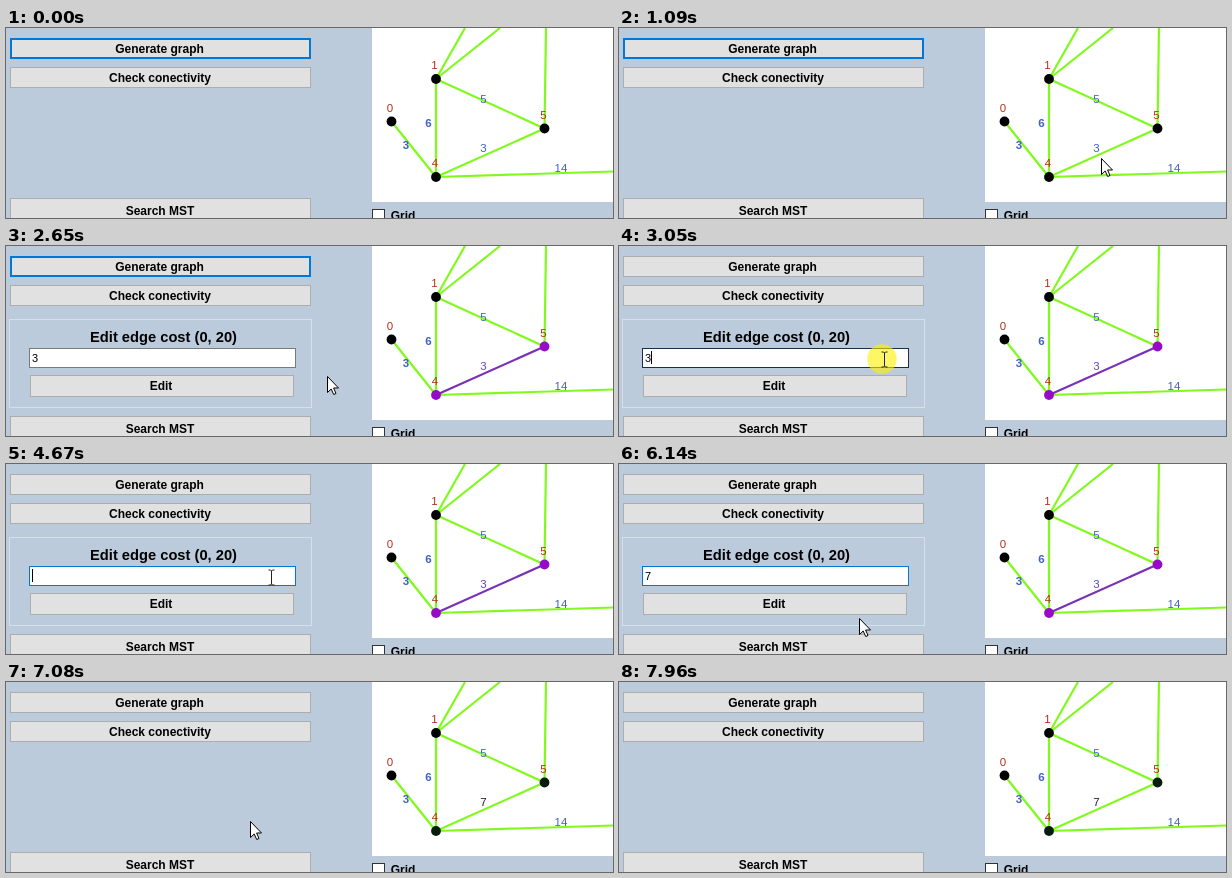
Write an HTML page that moves like this. It is 607x190 px and loops after 8820 ms.

```html
<!DOCTYPE html>
<html lang="en">
<head>
<meta charset="utf-8">
<title>Editing an edge cost</title>
<style>
  html, body { margin: 0; width: 100%; height: 100%; overflow: hidden; background: #bccbdb; }
  svg { display: block; font-family: "Liberation Sans", Arial, sans-serif; }
  .ui { font-weight: bold; font-size: 12px; }
  .ui text { text-anchor: middle; }
  .ui rect { fill: #e1e1e1; stroke: #adadad; }
  #graph { font-size: 11.5px; text-anchor: middle; }
  #edges path { fill: none; stroke: #80fa1c; stroke-width: 2.2; }
  #costs { fill: #3f62c6; }
  #names { fill: #b3301c; }
  #panel #box { fill: none; stroke: #d5e0ea; }
  #panel #field { fill: #fff; }
  #edit.hover { fill: #e5f1fb; stroke: #0078d7; }
</style>
</head>
<body>
<svg width="607" height="190" viewBox="0 0 607 190">
  <g class="ui">
    <rect x="4.5" y="10.5" width="300" height="20"/>
    <rect id="focus" x="5" y="11" width="299" height="19" style="stroke:#0078d7;stroke-width:2"/>
    <text x="153.5" y="25">Generate graph</text>
    <rect x="4.5" y="39.5" width="300" height="20"/>
    <text x="154" y="54">Check conectivity</text>
    <rect x="4.5" y="170.5" width="300" height="21"/>
    <text x="154" y="187">Search MST</text>
    <g id="panel">
      <rect id="box" x="3.5" y="73.5" width="302" height="88"/>
      <text x="157.5" y="96" font-size="14.7">Edit edge cost (0, 20)</text>
      <rect id="field" x="23.5" y="102.5" width="266" height="19"/>
      <text id="value" x="26" y="116" style="text-anchor:start;font-weight:normal;font-size:11px"></text>
      <path id="caret" d="M0 105V118" stroke="#000"/>
      <rect id="edit" x="24.5" y="129.5" width="263" height="21"/>
      <text x="155" y="144">Edit</text>
    </g>
    <rect x="366.5" y="181.5" width="12" height="12" style="fill:#fff;stroke:#333"/>
    <text x="397" y="192">Grid</text>
  </g>
  <g id="graph">
    <path d="M366 0H607V174H366Z" fill="#fff"/>
    <g id="edges">
      <path d="M459 0L430 51L494 0M540 0L538.5 100.5L430 51V149L385.5 93.5M430 149L607 143.5"/>
      <path id="edge" d="M430 149L538.5 100.5"/>
    </g>
    <g>
      <circle cx="385.5" cy="93.5" r="4.9"/>
      <circle cx="430" cy="51" r="4.9"/>
      <g id="ends">
        <circle cx="430" cy="149" r="4.9"/>
        <circle cx="538.5" cy="100.5" r="4.9"/>
      </g>
    </g>
    <g id="costs">
      <text x="477.5" y="75">5</text>
      <text x="422.5" y="99" font-weight="bold">6</text>
      <text x="400" y="121" font-weight="bold">3</text>
      <text x="555" y="144">14</text>
      <text id="cost" x="477.5" y="124"></text>
    </g>
    <g id="names">
      <text x="384" y="84">0</text>
      <text x="428.5" y="41">1</text>
      <text x="429" y="139">4</text>
      <text x="537.5" y="91">5</text>
    </g>
  </g>
  <circle id="click" r="14.7" fill="#fff000"/>
  <path id="arrow" d="M.5 .5V16.5L4.2 13L6.7 18.5L9 17.5L6.6 12H11.5Z" fill="#fff" stroke="#000"/>
  <path id="beam" d="M-3 -7.5H-1L0 -6.5L1 -7.5H3M0 -6.5V6.5M-3 7.5H-1L0 6.5L1 7.5H3" fill="none" stroke="#222"/>
</svg>
<script>
const LOOP = 8820, STEP = 80;
const $ = id => document.getElementById(id);
const show = (id, on) => $(id).style.display = on ? '' : 'none';
const within = (t, a, b) => t >= a && t < b;
const mix = (a, b, p) => Math.round(a + (b - a) * p);
const smooth = p => p * p * (3 - 2 * p);

const steps = (t, start, n) => Math.min(1, Math.max(0, Math.floor((t - start) / STEP) / n));

// Resting places [time, x, y] between the longer moves
const stops = [
  [1090, 482, 130], [1240, 481, 128], [1320, 480, 126], [1480, 480, 124],
  [2890, 265, 113], [5680, 269, 106], [5760, 266, 106], [6050, 263, 110],
  [6140, 240, 154], [6370, 241, 152], [6450, 242, 148], [6530, 244, 142],
  [6610, 244, 140], [6760, 244, 139]
];

function pointer(t) {
  if (t < 610 || t >= 7960 || within(t, 5130, 5680)) return null;
  if (t < 1090) {
    const p = steps(t, 610, 6), q = p * (2 - p);
    return [mix(500, 482, q), mix(182, 130, q)];
  }
  if (within(t, 2250, 2890)) {
    const p = smooth(steps(t, 2250 - STEP, 9));
    return [mix(480, 265, p), Math.round(124 - 11 * p + 72 * p * (1 - p))];
  }
  if (t >= 7400) {
    const p = steps(t, 7400 - STEP, 8) * 8 / 7, q = Math.pow(p, 1.3);
    return [mix(244, 407, q), mix(139, 182, q)];
  }
  return stops.filter(s => s[0] <= t).pop().slice(1);
}

function draw(t) {
  const editing = within(t, 1950, 7010), picked = within(t, 1950, 7080), done = t >= 7080;

  show('focus', t < 2970);
  show('panel', editing);
  $('value').textContent = t < 4670 ? '3' : t < 5130 ? '' : '7';
  $('field').style.stroke = t < 2970 ? '#7a7a7a' : t < 3190 ? '#14304c' : '#0078d7';
  show('caret', within(t, 2970, 3740) || within(t, 4290, 5680) || t >= 6370);
  $('caret').setAttribute('transform', `translate(${within(t, 4670, 5130) ? 26.5 : 32.5})`);

  $('edge').style.stroke = picked ? '#7a30b4' : '';
  $('ends').style.fill = picked ? '#960ac8' : done ? '#061c0e' : '#000';
  $('cost').textContent = done ? '7' : '3';
  $('cost').style.fill = picked ? '#6448bc' : done ? '#1c2444' : '';

  const pos = pointer(t);
  const inField = pos && editing && within(pos[0], 23, 290) && within(pos[1], 102, 122);
  $('edit').classList.toggle('hover', !!pos && within(pos[0], 24, 288) && within(pos[1], 129, 151));
  show('arrow', pos && !inField);
  show('beam', inField);
  if (pos) {
    $('arrow').setAttribute('transform', `translate(${pos})`);
    $('beam').setAttribute('transform', `translate(${pos[0] + .5} ${pos[1] + .5})`);
  }

  const onEdge = within(t, 1480, 1780), onField = within(t, 2970, 3110);
  show('click', onEdge || onField);
  $('click').setAttribute('transform', onField ? 'translate(263 113)' : 'translate(480 124)');
  $('click').style.opacity = within(t, 1630, 1780) ? .35 : .6;
}

const start = performance.now();
function tick() {
  draw((performance.now() - start) % LOOP);
  requestAnimationFrame(tick);
}
tick();
</script>
</body>
</html>
```
